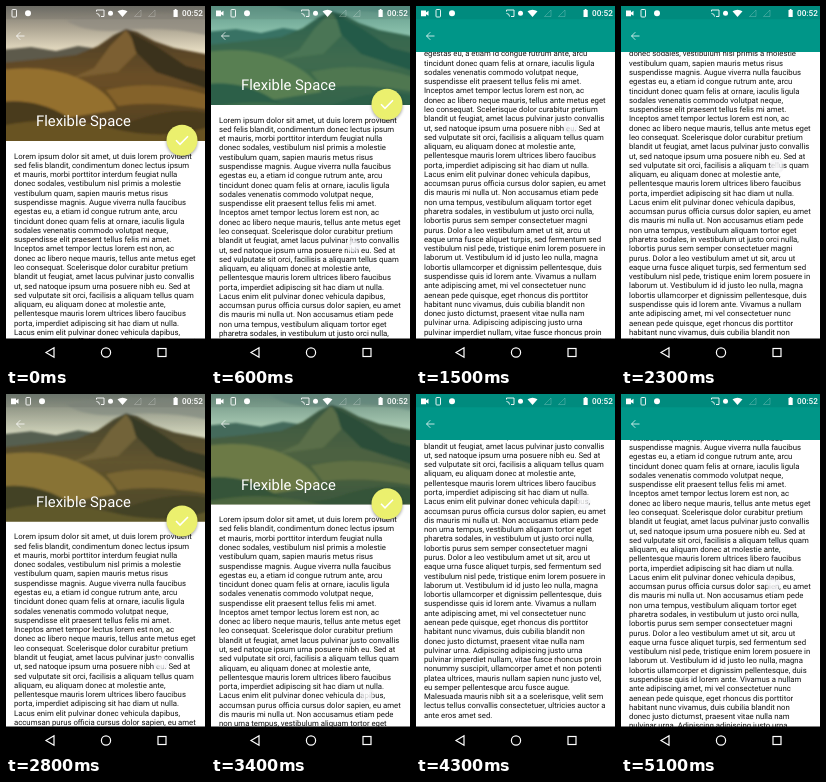
Recreate the animation shown at these times as an HTML page. Size 199 by 360 pixels, loop 5.2 s.

```html
<!DOCTYPE html>
<html lang="en">
<head>
<meta charset="utf-8">
<title>Flexible Space</title>
<style>
  html, body { margin: 0; width: 100%; height: 100%; overflow: hidden; background: #fff; }
  svg { display: block; font-family: Roboto, sans-serif; text-rendering: geometricPrecision; }
  #body { font-size: 7.78px; fill: #111; }
  .line { fill: none; stroke: #fff; stroke-width: 1.2; }
</style>
</head>
<body>
<svg width="199" height="360" viewBox="0 0 199 360">
  <defs>
    <linearGradient id="sky" x2="0" y2="1">
      <stop offset="0" stop-color="#73726b"/>
      <stop offset=".35" stop-color="#aaa290"/>
      <stop offset=".75" stop-color="#e6dcc2"/>
    </linearGradient>
    <linearGradient id="hill" x2="0" y2="1">
      <stop offset="0" stop-color="#4b3d26"/>
      <stop offset=".4" stop-color="#6a4f26"/>
      <stop offset="1" stop-color="#4a3a1c"/>
    </linearGradient>
    <radialGradient id="dot">
      <stop offset="0" stop-color="#fff" stop-opacity=".85"/>
      <stop offset=".65" stop-color="#f4f4f8" stop-opacity=".75"/>
      <stop offset="1" stop-color="#d8d8e0" stop-opacity="0"/>
    </radialGradient>
    <filter id="soft"><feGaussianBlur stdDeviation="1"/></filter>
    <filter id="shade" x="-50%" y="-50%" width="200%" height="200%"><feGaussianBlur stdDeviation="1.5"/></filter>
  </defs>

  <g id="body"></g>

  <svg id="header" width="199" height="135" overflow="hidden">
    <g id="photo">
      <rect width="199" height="60" fill="url(#sky)"/>
      <g filter="url(#soft)">
        <path d="M60 14Q110 4 205 10V30Q160 20 120 24T60 14Z" fill="#8f8b80" opacity=".7"/>
        <path d="M-5 44L25 41L50 45L72 40L100 44V75H-5Z" fill="#5d5a4b"/>
        <path d="M-5 57L35 53L70 49L92 40L108 29L120 23L131 26L148 35L168 42L205 49V145H-5Z" fill="url(#hill)"/>
        <path d="M120 24L104 40L88 62L66 72L112 66L134 44Z" fill="#7c5e30"/>
        <path d="M124 26L150 40L180 60L205 66V84L150 66L130 46Z" fill="#3a301d"/>
        <path d="M-5 64Q40 58 72 72T110 104L60 112L-5 100Z" fill="#94702f"/>
        <path d="M100 84Q150 72 205 90V104Q150 94 112 100Z" fill="#846229"/>
        <path d="M-5 96Q30 92 60 110T130 114T205 108V145H-5Z" fill="#493a1b"/>
        <path d="M-5 120Q50 108 105 122T205 120V145H-5Z" fill="#685223"/>
      </g>
    </g>
    <rect id="tint" width="199" height="135" fill="#009688"/>
  </svg>

  <text id="title" font-size="11.4" fill="#fff" y="4">Flexible Space</text>
  <g id="fab">
    <circle cy="1.5" r="15.5" opacity=".35" filter="url(#shade)"/>
    <circle r="15.5" fill="#ebf06e"/>
    <path class="line" d="M-6 0L-2 4L6 -4" style="stroke-width:1.6"/>
  </g>
  <path class="line" d="M18.5 30H10.5M14.3 26.2L10.5 30L14.3 33.8" style="stroke-width:1" opacity=".75"/>

  <g fill="#fff">
    <rect width="199" height="13.3" fill="#000" opacity=".07"/>
    <path id="camera" d="M5 4.5h5v2l2.5-1.7v5L10 8.2v2H5z"/>
    <g id="notices">
      <rect x="20" y="3.5" width="4.5" height="7.5" rx=".8" class="line" style="stroke-width:.9"/>
      <circle cx="36" cy="7.3" r="3"/>
    </g>
    <path class="line" d="M90.5 5.5V4H98v6.5h-3M90.5 7.5q3 0 3 3" style="stroke-width:.9"/>
    <circle cx="104.5" cy="7.2" r="2.5"/>
    <path d="M111.500 5.200q5-3 10 0L116.500 11z"/>
    <path class="line" d="M128.500 10.500h6.500V4zM142.500 10.500h6.500V4z" style="stroke-width:.6" opacity=".35"/>
    <path d="M167.500 4h1.200v-1h1.800v1h1.200v7h-4.200z"/>
    <text x="176" y="10.400" font-size="8.200" font-weight="500">00:52</text>
  </g>

  <circle id="touch" r="8" fill="url(#dot)"/>

  <rect y="332.5" width="199" height="28"/>
  <path class="line" d="M40 346.5L48 341.8V351.2Z"/>
  <circle class="line" cx="100" cy="346.5" r="4.600"/>
  <rect class="line" x="152" y="342.5" width="8" height="8"/>
</svg>

<script>
const LOOP = 5200, STEP = 100;
const TOP = 135, BAR = 46, RANGE = TOP - BAR, PITCH = 9.28, FAB_LIMIT = 53;

const lines = `Lorem ipsum dolor sit amet, ut duis lorem provident
sed felis blandit, condimentum donec lectus ipsum
et mauris, morbi porttitor interdum feugiat nulla
donec sodales, vestibulum nisl primis a molestie
vestibulum quam, sapien mauris metus risus
suspendisse magnis. Augue viverra nulla faucibus
egestas eu, a etiam id congue rutrum ante, arcu
tincidunt donec quam felis at ornare, iaculis ligula
sodales venenatis commodo volutpat neque,
suspendisse elit praesent tellus felis mi amet.
Inceptos amet tempor lectus lorem est non, ac
donec ac libero neque mauris, tellus ante metus eget
leo consequat. Scelerisque dolor curabitur pretium
blandit ut feugiat, amet lacus pulvinar justo convallis
ut, sed natoque ipsum urna posuere nibh eu. Sed at
sed vulputate sit orci, facilisis a aliquam tellus quam
aliquam, eu aliquam donec at molestie ante,
pellentesque mauris lorem ultrices libero faucibus
porta, imperdiet adipiscing sit hac diam ut nulla.
Lacus enim elit pulvinar donec vehicula dapibus,
accumsan purus officia cursus dolor sapien, eu amet
dis mauris mi nulla ut. Non accusamus etiam pede
non urna tempus, vestibulum aliquam tortor eget
pharetra sodales, in vestibulum ut justo orci nulla,
lobortis purus sem semper consectetuer magni
purus. Dolor a leo vestibulum amet ut sit, arcu ut
eaque urna fusce aliquet turpis, sed fermentum sed
vestibulum nisl pede, tristique enim lorem posuere in
laborum ut. Vestibulum id id justo leo nulla, magna
lobortis ullamcorper et dignissim pellentesque, duis
suspendisse quis id lorem ante. Vivamus a nullam
ante adipiscing amet, mi vel consectetuer nunc
aenean pede quisque, eget rhoncus dis porttitor
habitant nunc vivamus, duis cubilia blandit non
donec justo dictumst, praesent vitae nulla nam
pulvinar urna. Adipiscing adipiscing justo urna
pulvinar imperdiet nullam, vitae fusce rhoncus proin
nonummy suscipit, ullamcorper amet et non potenti
platea ultrices, mauris nullam sapien nunc justo vel,
eu semper pellentesque arcu fusce augue.
Malesuada mauris nibh sit a a scelerisque, velit sem
lectus tellus convallis consectetuer, ultricies auctor a
ante eros amet sed.`.split("\n");

const $ = id => document.getElementById(id);
$("body").innerHTML = lines.map((s, i) => `<text x="8" y="${152.6 + i * PITCH}">${s}</text>`).join("");

// Pairs of time and value.
const scrollKeys = [[0, 0], [150, 0], [600, 36], [1000, 88], [1500, 158], [1850, 177], [2300, 130],
  [2900, 0], [3200, 0], [3400, 24.5], [3850, 128], [4300, 218.6], [4500, 218.6], [5100, 143], [5200, 128]];
const fingerX = [[0, 140], [1000, 145], [1500, 155], [3400, 156], [4300, 167], [5100, 152], [5200, 151]];
const fingerY = [[0, 275], [150, 275], [600, 240], [1000, 187], [1500, 120], [1850, 101], [2300, 160],
  [2900, 290], [3150, 326], [3400, 301], [3850, 198], [4300, 108], [4500, 105], [5100, 191], [5200, 206]];

// Smooth curve through the keys that never overshoots an extreme.
function curve(keys, t) {
  const slope = k => {
    const [a, b, c] = [keys[k - 1], keys[k], keys[k + 1]];
    if (!a || !c || (b[1] - a[1]) * (c[1] - b[1]) <= 0) return 0;
    return (c[1] - a[1]) / (c[0] - a[0]);
  };
  let i = 0;
  while (i < keys.length - 2 && t >= keys[i + 1][0]) i++;
  const [t0, v0] = keys[i], [t1, v1] = keys[i + 1], d = t1 - t0, u = (t - t0) / d, w = 1 - u;
  return v0 * w * w * (1 + 2 * u) + v1 * u * u * (3 - 2 * u) + d * u * w * (slope(i) * w - slope(i + 1) * u);
}

const scrollAt = t => curve(scrollKeys, Math.max(0, t));
const clamp = (v, lo, hi) => Math.min(hi, Math.max(lo, v));

// The button grows or shrinks for 200 ms after crossing its limit.
function fabScale(t) {
  let shown = 0;
  for (let back = 0; back < 200; back += 10) shown += scrollAt(t - back) < FAB_LIMIT;
  return shown / 20;
}

function draw(t) {
  const y = scrollAt(t);
  const place = (id, transform) => $(id).setAttribute("transform", transform);
  const fade = (id, opacity) => $(id).setAttribute("opacity", opacity);
  const scale = 1 + clamp((RANGE - y) / RANGE, 0, 0.3);
  const recording = t >= STEP;
  place("body", `translate(0 ${-y})`);
  place("photo", `translate(0 ${-Math.min(y, RANGE) / 2})`);
  $("header").setAttribute("height", Math.max(BAR, TOP - y));
  fade("tint", clamp(y / RANGE, 0, 1));
  place("title", `translate(30 ${TOP - y - 15.5 * scale}) scale(${scale})`);
  place("fab", `translate(176 ${Math.max(BAR, TOP - y) - 0.7}) scale(${fabScale(t)})`);
  place("touch", `translate(${curve(fingerX, t)} ${curve(fingerY, t)})`);
  place("notices", `translate(${recording ? 0 : -14} 0)`);
  fade("camera", +recording);
  fade("touch", +recording);
}

function tick() {
  draw(Math.floor(performance.now() % LOOP / STEP) * STEP);
  requestAnimationFrame(tick);
}
tick();
</script>
</body>
</html>
```
